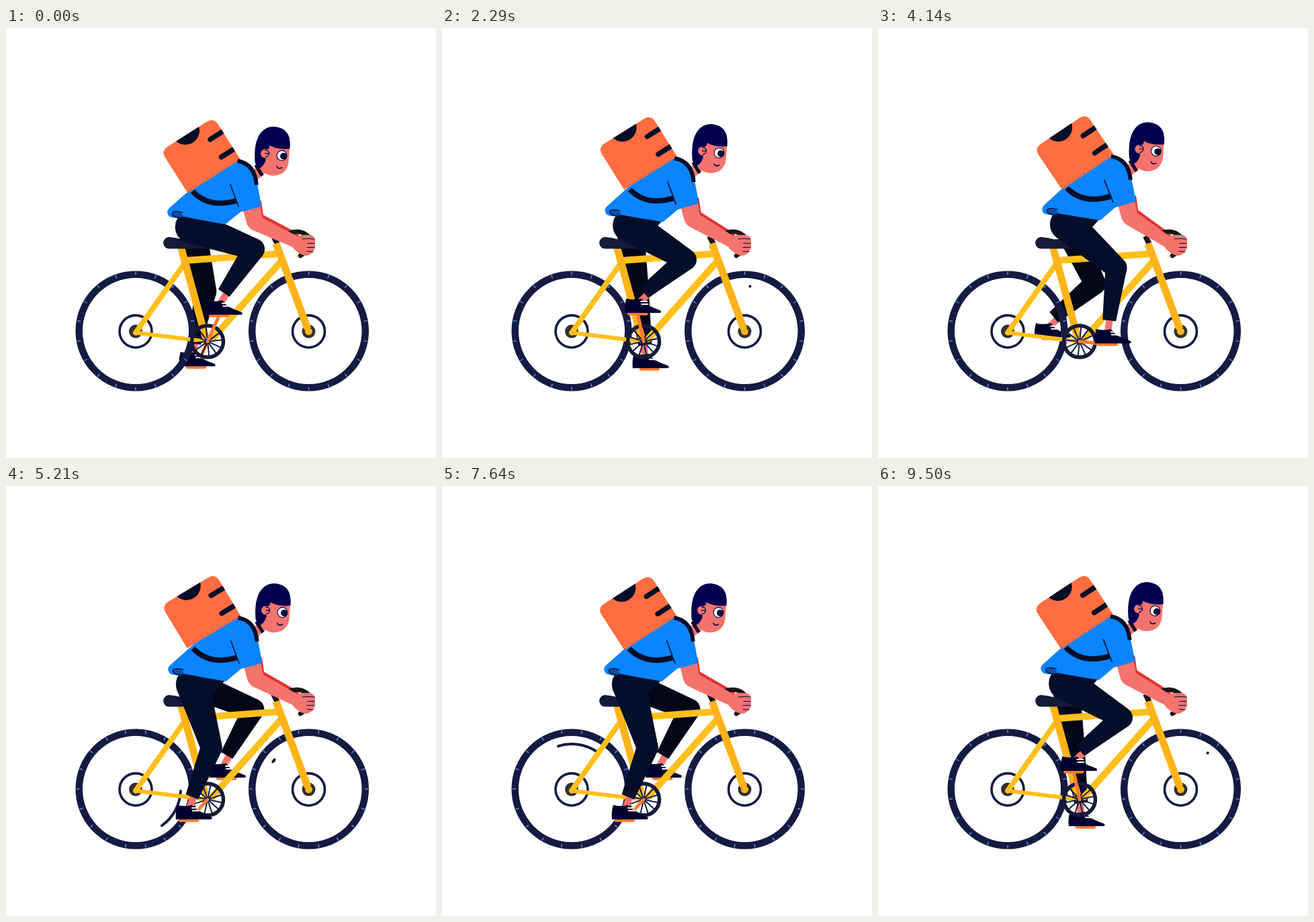
An HTML page with a canvas that plays this animation: 640 px wide and 640 px high, repeating every 9.57 s.

```html
<!DOCTYPE html>
<html>
<head>
<meta charset="utf-8">
<title>Cycling courier</title>
<style>
html, body { margin: 0; width: 100%; height: 100%; overflow: hidden; background: #fff; }
canvas { display: block; }
</style>
</head>
<body>
<canvas id="stage" width="640" height="640"></canvas>
<script>
const ctx = document.getElementById('stage').getContext('2d');
const LOOP = 9570, TAU = Math.PI * 2, DEG = Math.PI / 180;
const NAVY = '#050e28', TIRE = '#151a42', SHOE = '#00002e', SKIN = '#f5736d', HAIR = '#00004f';
const GOLD = '#ffc01c', AMBER = '#ffb31a', ORANGE = '#ff7c2e', FAR_PANTS = '#030616';
const CRANK = [300, 466.6];

function fill(d, color) {
  ctx.fillStyle = color;
  ctx.fill(new Path2D(d));
}
function line(d, color, width, cap = 'round') {
  ctx.strokeStyle = color;
  ctx.lineWidth = width;
  ctx.lineCap = cap;
  ctx.lineJoin = 'round';
  ctx.stroke(new Path2D(d));
}
function disc(x, y, r, color) {
  ctx.fillStyle = color;
  ctx.beginPath();
  ctx.arc(x, y, r, 0, TAU);
  ctx.fill();
}
function ring(x, y, r, color, width, from = 0, to = TAU) {
  ctx.strokeStyle = color;
  ctx.lineWidth = width;
  ctx.lineCap = 'round';
  ctx.beginPath();
  ctx.arc(x, y, r, from, to);
  ctx.stroke();
}
function spokes(x, y, r1, r2, count, start, color, width) {
  for (let i = 0; i < count; i++) {
    const a = start + i * TAU / count, c = Math.cos(a), s = Math.sin(a);
    line(`M${x + r1 * c} ${y + r1 * s}L${x + r2 * c} ${y + r2 * s}`, color, width, 'butt');
  }
}
// A limb section that narrows from radius r1 to r2
function taper([x1, y1], r1, [x2, y2], r2, color) {
  const len = Math.hypot(x2 - x1, y2 - y1), nx = (y1 - y2) / len, ny = (x2 - x1) / len;
  fill(`M${x1 + nx * r1} ${y1 + ny * r1}L${x2 + nx * r2} ${y2 + ny * r2}` +
    `L${x2 - nx * r2} ${y2 - ny * r2}L${x1 - nx * r1} ${y1 - ny * r1}Z`, color);
}
function at(x, y, angle, draw) {
  ctx.save();
  ctx.translate(x, y);
  ctx.rotate(angle);
  draw();
  ctx.restore();
}

function kneeOf(hip, ankle, thigh = 98, shin = 90) {
  const dx = ankle[0] - hip[0], dy = ankle[1] - hip[1], d = Math.hypot(dx, dy);
  const a = (thigh * thigh - shin * shin + d * d) / (2 * d);
  const h = Math.sqrt(Math.max(0, thigh * thigh - a * a));
  return [hip[0] + (a * dx + h * dy) / d, hip[1] + (a * dy - h * dx) / d];
}
function leg(hip, hipRadius, angle, footShift, color) {
  const px = CRANK[0] + 42 * Math.sin(angle), py = CRANK[1] - 42 * Math.cos(angle);
  const fx = px + footShift;
  const ankle = [fx + 1, py - 25], knee = kneeOf(hip, ankle);
  const cuff = knee.map((v, i) => v + (ankle[i] - v) * 0.88);
  line(`M${CRANK}L${px} ${py}`, ORANGE, 5);
  line(`M${px - 13} ${py}h26`, ORANGE, 4.5);
  taper(knee, 6, [fx, py - 15], 5, SKIN);
  at(fx, py, 0, () => {
    fill('M-17-23Q-6-20 5-23L13-14Q23-9 34-5Q36-2 33-1.5H-19Q-20-14-17-23Z', SHOE);
    line('M5-18.5h9M6-14.5h9', '#fff', 2);
  });
  taper(knee, 16, cuff, 10, color);
  taper(hip, hipRadius, knee, 16, color);
  disc(...hip, hipRadius, color);
  disc(...knee, 16, color);
}

function wheel(x, k, glint, glintLength) {
  const y = 451;
  ring(x, y, 84.3, TIRE, 10.5);
  spokes(x, y, 83.5, 88.5, 18, (k + 1) * 10 * DEG, '#5f93ee', 1.4);
  ring(x, y + 0.6, 24, TIRE, 3.6);
  disc(x, y + 0.6, 10, '#33302f');
  if (glintLength >= 0) {
    const end = glint - glintLength * 0.15;
    ring(x, y, 67, TIRE, 4, (end - glintLength - 0.2) * DEG, end * DEG);
  }
}
function rearGlint(k) {
  const p = k % 20;
  return p < 5 || p > 18 ? -1 : 52 * Math.sin(Math.PI * (p - 5) / 13);
}
function frontGlint(k) {
  const p = k % 48;
  if (p < 10 || p > 46) return -1;
  return p < 14 ? 17 * (p - 10) : 68 * ((46 - p) / 32) ** 2.9;
}

function bikeFrame() {
  line('M398 309L404 321', '#151515', 8, 'butt');
  line('M267 348L193 453', GOLD, 8);
  line('M193 453L298 466', GOLD, 6);
  line('M411 345L307 462', GOLD, 10);
  line('M268 345.5L406 335.5', GOLD, 10);
  line('M260 324L297 460', AMBER, 11, 'butt');
  line('M402 320L449 447', AMBER, 11, 'butt');
  disc(450.5, 451, 5.5, AMBER);
  fill('M242 310.5Q252 311 262 314L290 313Q297 315 297 328H242A8.8 8.8 0 0 1 242 310.5Z', '#151a36');
}
function chainring(angle) {
  spokes(...CRANK, 0, 22, 12, angle, TIRE, 2);
  ring(...CRANK, 23.5, '#171a36', 5.5);
  disc(...CRANK, 4, TIRE);
}

function bag(tilt) {
  at(351, 188.5, -34 * DEG + tilt, () => {
    const shape = 'M0 0H-93V-62Q-93-74-81-74H-12Q0-74 0-62Z';
    fill(shape, '#ff6d40');
    ctx.clip(new Path2D(shape));
    disc(-46, -80, 21, NAVY);
    line('M-22-49H6M-22-18H6', NAVY, 7.5);
  });
}
function torso(tilt) {
  fill('M346 191Q364 194 372 209Q378 222 384 258L353 267L331 286Q296 281 263 275Q254 280 247 276Q241 269 248 263L273 240Q300 214 346 191Z', '#0a84ff');
  fill('M264 279Q249 279 251 271Q254 267 263 269L268 274Z', '#0b4fa8');
  line('M266 278Q250 277 252 270Q256 267 267 270', '#061a4a', 1.5);
  line('M337 226L350 259', '#061a4a', 1.8);
  line('M281 238Q306 263 346 250.5', NAVY, 8, 'butt');
  bag(tilt);
  line('M347 191Q373 195 376 226', NAVY, 6, 'butt');
}
function head() {
  line('M372 214L388 200', SKIN, 15, 'butt');
  line('M375 197L385 213', NAVY, 5, 'butt');
  fill('M386 166L426 166L424 193Q421 213 400 213Q384 212 382 195Z', SKIN);
  disc(421, 196.5, 2.3, SKIN);
  fill('M374 193Q372 167 380 153Q388 140 402 140Q420 141 425 156Q427 164 426 173Q408 175 396 168L395 172L390 176V190Q387 199 381 202Q376 201 374 193Z', HAIR);
  disc(389, 180, 6.5, SKIN);
  line('M389 175Q395 175 395 180Q394 185 390 185M389 180H394', HAIR, 1.2);
  disc(414, 183, 8, HAIR);
  disc(414, 183, 6.9, '#fff');
  disc(416.5, 184, 5, '#050d38');
  line('M406.5 199Q408 204 414 201', HAIR, 1.6);
}
function farArm(dx, dy) {
  line(`M${381 + dx} ${252 + dy}L${384 + dx} ${273 + dy}L432 308`, '#e6302f', 7);
  line('M419 306Q437 299 449 309Q456 319 451 330L438 339', '#161616', 6.5);
}
function nearArm(dx, dy) {
  const p = (x, y) => `${x + dx} ${y + dy} `;
  fill(`M${p(355, 255)}L${p(362, 281)}Q${p(364, 289)}${p(371, 293)}L429 327L434 310L${p(386, 275)}L${p(381, 250)}Z`, SKIN);
  fill('M426 317Q432 309 440 308H453Q459 309 460 316V327Q457 337 447 339Q436 338 427 327Z', SKIN);
  line('M441 314Q450 313 459 314M449 320.5H459M448 326.5H459M448 332.5L457 333', HAIR, 1.2);
}

function drawPose(k) {
  const crank = (24 + 18 * k) * DEG;
  const dip = (1 + Math.cos(TAU * (k - 1.5) / 12)) / 2;
  const phase = k % 24;
  const tilt = phase > 8 && phase < 22 ? 3 * DEG * Math.sin(Math.PI * (phase - 8) / 14) : 0;
  const hip = [281 - 5 * dip, 292 + 5 * dip];
  const turn = k * 25 / 6;
  const leanBody = draw => at(250 - 5 * dip, 270 + 5 * dip, 0.03 * dip, () => {
    ctx.translate(-250, -270);
    draw();
  });

  ctx.fillStyle = '#fff';
  ctx.fillRect(0, 0, 640, 640);
  leg(hip, 21, crank + Math.PI, -6, FAR_PANTS);
  wheel(193, k, turn - 123.7, rearGlint(k));
  wheel(450.5, k, turn + 35.3, frontGlint(k));
  farArm(-5 * dip, 9 * dip);
  at(0, 0.6, 0, bikeFrame);
  chainring(crank);
  leg(hip, 25, crank, 0, NAVY);
  leanBody(() => fill('M257 285L266 272L330 284L306 311L275 314Z', NAVY));
  nearArm(-5 * dip, 9 * dip);
  at(-4 * dip, 8 * dip, 0, head);
  leanBody(() => torso(tilt));
}

// Poses advance at 25 per second and are shown 14 times per second
function tick() {
  const shown = Math.floor((performance.now() % LOOP + 5) * 0.014);
  const seconds = Math.round(shown * 100 / 14) / 100;
  drawPose(Math.ceil(seconds * 25 - 1e-6));
  requestAnimationFrame(tick);
}
tick();
</script>
</body>
</html>
```
